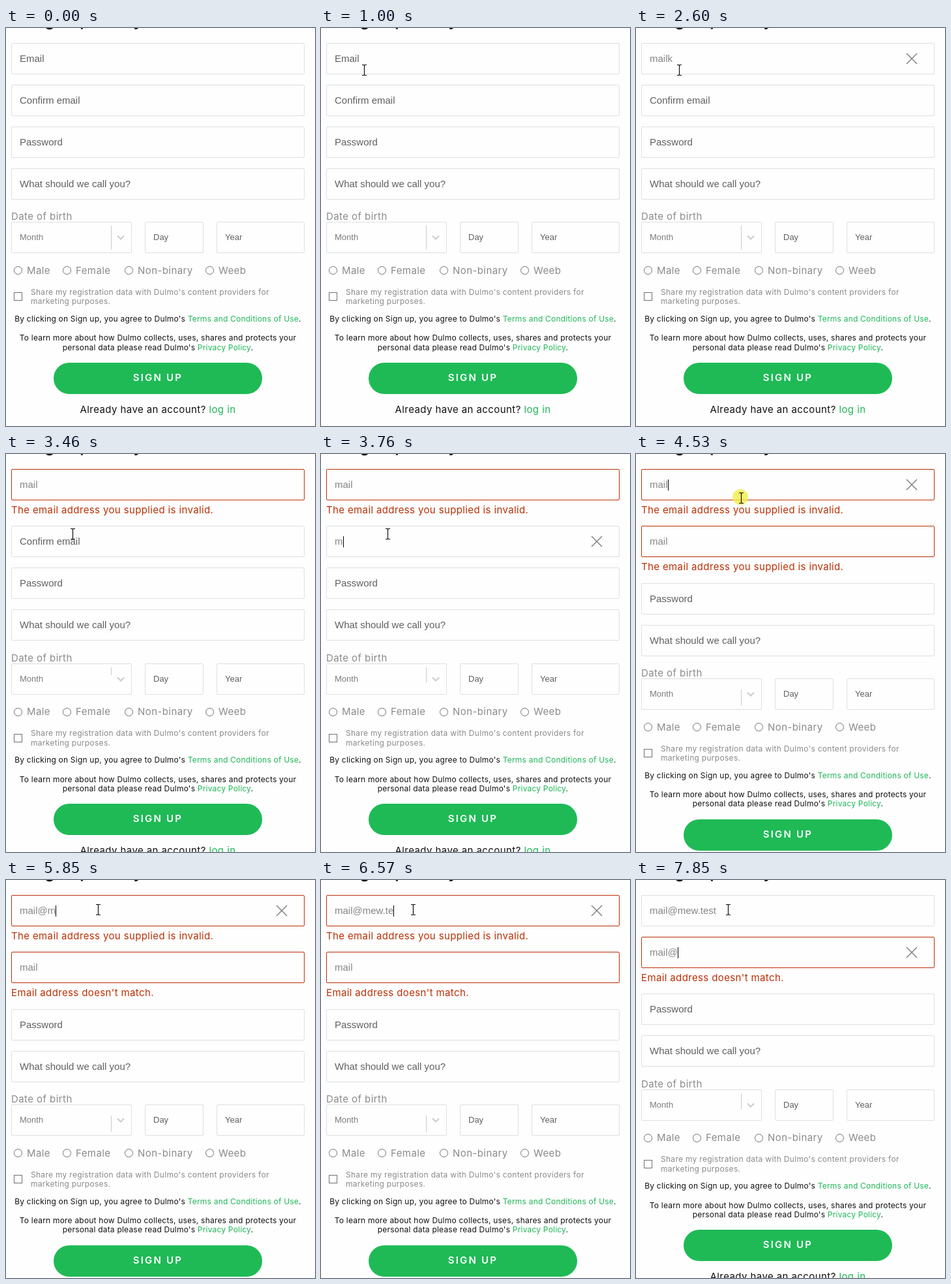
These frames come from a looping animation (474 by 610 pixels, 8000 ms). An HTML page:

```html
<!DOCTYPE html>
<html lang="en">
<head>
<meta charset="utf-8">
<title>Sign up form</title>
<style>
html, body { margin: 0; width: 474px; height: 610px; overflow: hidden; background: #fefefe; }
#stage { position: relative; width: 474px; height: 610px; overflow: hidden; font: 15px/20px Inter, Montserrat, sans-serif; letter-spacing: .42px; color: #8a8a8a; }
#stage div, #stage p, #stage i, #stage svg { position: absolute; box-sizing: border-box; margin: 0; white-space: nowrap; }
#stage p { left: 8px; }
#stage .mid { width: 450px; text-align: center; color: #111; }
#stage .small { font-size: 12px; letter-spacing: .21px; }
#stage .share { left: 38px; letter-spacing: .29px; }
#stage h1 { position: absolute; left: 0; top: -26px; width: 466px; margin: 0; text-align: center; font-size: 24px; line-height: 30px; font-weight: 600; letter-spacing: .8px; white-space: nowrap; color: #111; }
a { color: #1fb657; }
.group { left: 0; width: 474px; }
.box { left: 8px; width: 450px; height: 48px; padding-left: 12px; border: 1px solid #dcdfe3; border-radius: 2px; background: #fefefe; font: 15px/46px "Liberation Sans", Arial, sans-serif; letter-spacing: 0; color: #606060; }
.date { top: 0; font-size: 13px; }
.bad { border-color: #bb3005; }
.value { color: #858585; }
.picked { background: #0078d7; color: #fff; line-height: 18px; display: inline-block; }
.caret { display: inline-block; width: 1px; height: 17px; margin-right: -1px; vertical-align: -4px; background: #000; }
#stage .close { left: 405px; top: 14px; width: 18px; height: 18px; stroke: #808080; stroke-width: 1.5; }
#stage .error { top: 53px; color: #bb3005; letter-spacing: .37px; }
#stage .radio { top: 68px; width: 13px; height: 13px; border: 1px solid #707070; border-radius: 50%; background: #fff; }
#stage .check { left: 12px; top: 108px; width: 13px; height: 13px; border: 1px solid #707070; background: #fff; }
#sep { left: 152px; width: 1px; background: #ccc; }
#button { left: 73px; top: 215.6px; width: 320px; height: 48px; border-radius: 24px; background: #1fba56; color: #fff; font-weight: 600; line-height: 46px; letter-spacing: 2.2px; text-align: center; }
#halo { width: 24px; height: 24px; border-radius: 50%; background: #f3ee48cc; }
</style>
</head>
<body>
<div id="stage">
  <h1>Sign up with your email address</h1>
  <div class="group" id="email" style="top:23px"></div>
  <div class="group" id="confirm"></div>
  <div class="group" id="rest">
    <div class="box" style="top:-146.4px">Password</div>
    <div class="box" style="top:-82.4px">What should we call you?</div>
    <p style="top:-18px">Date of birth</p>
    <div class="box date" style="width:185px;color:#7c7c7c">Month
      <i id="sep"></i>
      <svg style="left:161px;top:19px" width="12" height="9" fill="none" stroke="#ccc" stroke-width="2"><path d="M1 1.5L6 6.5L11 1.5"/></svg>
    </div>
    <div class="box date" style="left:213px;width:90px">Day</div>
    <div class="box date" style="left:323px;width:135px">Year</div>
    <i class="radio" style="left:12px"></i><p style="left:32px;top:64.5px">Male</p>
    <i class="radio" style="left:87px"></i><p style="left:107px;top:64.5px">Female</p>
    <i class="radio" style="left:182px"></i><p style="left:202px;top:64.5px">Non-binary</p>
    <i class="radio" style="left:306px"></i><p style="left:326px;top:64.5px">Weeb</p>
    <i class="check"></i>
    <p class="small share" style="top:97.5px">Share my registration data with Dulmo's content providers for</p>
    <p class="small share" style="top:112px">marketing purposes.</p>
    <p class="small mid" style="top:138.7px">By clicking on Sign up, you agree to Dulmo's <a>Terms and Conditions of Use</a>.</p>
    <p class="small mid" style="top:168px">To learn more about how Dulmo collects, uses, shares and protects your</p>
    <p class="small mid" style="top:182.3px">personal data please read Dulmo's <a>Privacy Policy</a>.</p>
    <div id="button">SIGN UP</div>
    <p class="mid" style="top:277.7px">Already have an account? <a>log in</a></p>
  </div>
  <div id="halo"></div>
  <svg id="beam" width="11" height="19" fill="none">
    <path d="M2 1.5H4.5L5.5 2.5L6.5 1.5H9M5.5 2.5V16.5M2 17.5H4.5L5.5 16.5L6.5 17.5H9" stroke="#111" stroke-width="1.2"/>
  </svg>
  <svg id="arrow" width="14" height="20"><path d="M1 1V16L4.6 12.6L7 18L9.2 17L6.9 11.8H12Z" fill="#fff" stroke="#000"/></svg>
</div>
<script>
const LOOP = 8000, ERROR_HEIGHT = 23.4;
const INVALID = 'The email address you supplied is invalid.';
const MISMATCH = "Email address doesn't match.";
const $ = id => document.getElementById(id);

// Each event patches the form state and restarts the caret blink.
const events = [];
const at = (time, patch) => events.push({ time, patch });
const type = (field, before, text, start, gap) => [...text].forEach((_, i) =>
  at(start + i * gap, { [field]: before + text.slice(0, i + 1) }));

at(0, { email: '', confirm: '', focus: '', emailError: '', confirmError: '', picked: false, sep: [6, 43] });
at(640, { focus: 'email' });
type('email', '', 'mailk', 1760, 115);
at(2860, { email: 'mail' });
at(3100, { focus: 'confirm', emailError: INVALID, sep: [6, 18] });
at(3690, { sep: [6, 30] });
type('confirm', '', 'mail', 3690, 90);
at(4480, { focus: 'email', confirmError: INVALID, sep: [17, 42] });
at(5370, { email: 'mail@', confirmError: MISMATCH });
type('email', 'mail@', 'mew.', 5850, 100);
type('email', 'mail@mew.', 'test', 6490, 60);
at(6610, { emailError: '', sep: [6, 30] });
at(7150, { focus: 'confirm', picked: true });
at(7650, { picked: false });
at(7850, { confirm: 'mail@' });
events.sort((a, b) => a.time - b.time);

// Pointer stops: time, x, y
const path = [
  [230, 372, 602], [600, 66.5, 64], [2890, 66.5, 64], [3050, 102.5, 122],
  [4250, 102.5, 122], [4460, 161.5, 67], [4620, 161.5, 67], [4910, 146.5, 40],
  [5040, 146.5, 40], [5210, 141.5, 45], [LOOP, 141.5, 45]
];
const clicks = [[620, 720], [3060, 3140], [4480, 4600]];

const fields = {};
for (const [id, hint] of [['email', 'Email'], ['confirm', 'Confirm email']]) {
  $(id).innerHTML = '<div class="box"><span class="text"></span><span class="caret"></span>' +
    '<svg class="close"><path d="M1 1L17 17M17 1L1 17"/></svg></div><p class="error"></p>';
  const find = name => $(id).querySelector('.' + name);
  fields[id] = { hint, box: find('box'), text: find('text'), caret: find('caret'), close: find('close'), error: find('error') };
}

const show = (el, on) => el.style.visibility = on ? 'visible' : 'hidden';
const clamp = v => Math.max(0, Math.min(1, v));
const place = (el, x, y) => { el.style.left = x + 'px'; el.style.top = y + 'px'; };

function blink(age) {
  const a = age % 700;
  return a < 610 ? 1 - clamp((a - 260) / 100) : clamp((a - 620) / 60);
}

function drawField(id, s, age) {
  const f = fields[id], value = s[id], error = s[id + 'Error'];
  const active = s.focus === id, picked = active && s.picked;
  f.box.className = error ? 'box bad' : 'box';
  f.text.textContent = value || f.hint;
  f.text.className = picked ? 'picked' : value ? 'value' : '';
  // An empty field shows its caret in front of the hint.
  if (value) f.text.after(f.caret); else f.text.before(f.caret);
  f.caret.style.opacity = active && !picked ? blink(age) : 0;
  show(f.close, active && value);
  f.error.textContent = error;
}

function drawPointer(t) {
  const i = Math.max(1, path.findIndex(p => p[0] > t));
  const [t0, x0, y0] = path[i - 1], [t1, x1, y1] = path[i];
  const k = clamp((t - t0) / (t1 - t0)), ease = k * k * (3 - 2 * k);
  const x = x0 + (x1 - x0) * ease, y = y0 + (y1 - y0) * ease;
  const visible = t >= 230, overField = y < 265;
  place($('beam'), Math.round(x - 5.5), Math.round(y - 9));
  place($('arrow'), Math.round(x), Math.round(y));
  place($('halo'), x - 14, y - 13);
  show($('beam'), visible && overField);
  show($('arrow'), visible && !overField);
  show($('halo'), clicks.some(([a, b]) => t >= a && t < b));
}

function draw(t) {
  const past = events.filter(e => e.time <= t);
  const s = Object.assign({}, ...past.map(e => e.patch));
  const age = t - past[past.length - 1].time;
  drawField('email', s, age);
  drawField('confirm', s, age);
  const first = s.emailError ? ERROR_HEIGHT : 0;
  const both = first + (s.confirmError ? ERROR_HEIGHT : 0);
  $('confirm').style.top = 87 + first + 'px';
  $('rest').style.top = 297.3 + both + 'px';
  $('sep').style.top = s.sep[0] - 1 + 'px';
  $('sep').style.height = s.sep[1] - s.sep[0] + 'px';
  drawPointer(t);
}

const start = performance.now();
function tick() {
  draw((performance.now() - start) % LOOP);
  requestAnimationFrame(tick);
}
tick();
</script>
</body>
</html>
```
